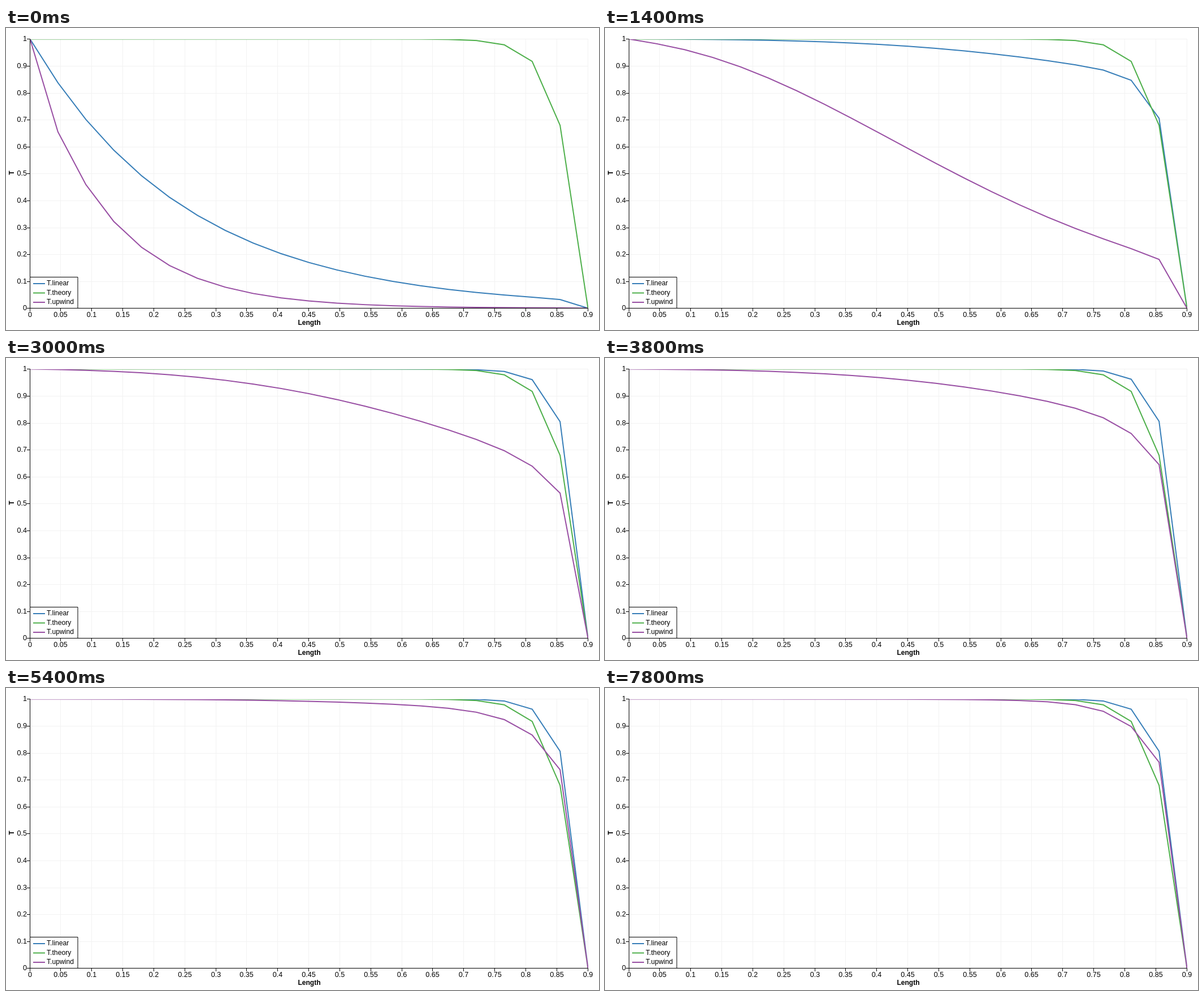
These frames come from a looping animation (1049 px wide and 534 px high, 8000 ms). An HTML page with a canvas:

```html
<!DOCTYPE html>
<html>
<head>
<meta charset="utf-8">
<style>
  html, body { margin: 0; width: 100%; height: 100%; overflow: hidden; background: #fff; }
  canvas { display: block; }
</style>
</head>
<body>
<canvas id="stage" width="1049" height="534"></canvas>
<script>
const W = 1049, H = 534;
const ctx = document.getElementById('stage').getContext('2d');
const CELLS = 20, STEPS = 40, STEP_MS = 200;
const PECLET = 1.35;        // cell Peclet number
const D = 1 / PECLET;       // diffusion coefficient relative to convection
const BLUE = '#377eb8', GREEN = '#4daf4a', PURPLE = '#984ea3';
const FONT = '"Liberation Sans", Arial, sans-serif';
const LEFT = 42.5, TOP = 19.5, SPAN_X = 987, SPAN_Y = 476;
const RIGHT = LEFT + SPAN_X, BOTTOM = TOP + SPAN_Y;

// Tick positions snapped to whole pixels.
const xTicks = Array.from({ length: 19 }, (_, i) => LEFT + Math.floor(i * SPAN_X / 18));
const yTicks = Array.from({ length: 11 }, (_, i) => BOTTOM - Math.floor(i * SPAN_Y / 10));

// Curves are drawn at double size so that overlapping edges do not mix.
const plot = document.createElement('canvas');
plot.width = 2 * W;
plot.height = 2 * H;
const plotCtx = plot.getContext('2d');
plotCtx.scale(2, 2);
plotCtx.beginPath();
plotCtx.rect(43, 20, 987, 476);
plotCtx.clip();

// Cell values to node values, with 1 at the inlet and 0 at the outlet.
const toNodes = c => [1, ...c.slice(1).map((v, i) => (v + c[i]) / 2), 0];

// Steady convection-diffusion: one Gauss-Seidel sweep per step.
function solve(west, east, first, last) {
  const c = Array(CELLS).fill(0), history = [];
  for (let n = 0; n < STEPS; n++) {
    for (let i = 0; i < CELLS; i++) {
      const inflow = i ? west * c[i - 1] : 1 + 2 * D;
      const back = i < CELLS - 1 ? east * c[i + 1] : 0;
      const diag = i === 0 ? first : i === CELLS - 1 ? last : west + east;
      c[i] = (inflow + back) / diag;
    }
    history.push(toNodes(c));
  }
  return history;
}

const linear = solve(D + 0.5, D - 0.5, 3 * D + 0.5, 3 * D - 0.5);
const upwind = solve(D + 1, D, 3 * D + 1, 3 * D);
const theory = toNodes(Array.from({ length: CELLS },
  (_, i) => 1 - Math.exp(PECLET * (i + 0.5 - CELLS))));

function line(points, color, width, g = ctx) {
  g.beginPath();
  points.forEach(([x, y]) => g.lineTo(x, y));
  g.strokeStyle = color;
  g.lineWidth = width;
  g.stroke();
}

function text(str, x, y, align, font) {
  ctx.font = font + ' ' + FONT;
  ctx.textAlign = align;
  ctx.fillStyle = '#000';
  ctx.fillText(str, x, y);
}

function curve(nodes, color) {
  line(nodes.map((v, i) => [LEFT + i / CELLS * SPAN_X, BOTTOM - v * SPAN_Y]), color, 2, plotCtx);
}

function curves(step) {
  plotCtx.clearRect(0, 0, W, H);
  curve(linear[step], BLUE);
  curve(theory, GREEN);
  curve(upwind[step], PURPLE);
  ctx.drawImage(plot, 0, 0, W, H);
}

function grid() {
  xTicks.forEach(x => line([[x, TOP], [x, BOTTOM]], '#f2f2f2', 1));
  yTicks.forEach(y => line([[LEFT, y], [RIGHT, y]], '#f2f2f2', 1));
}

function axes() {
  line([[LEFT, 19], [LEFT, 496]], '#000', 1);
  line([[42, BOTTOM], [1030, BOTTOM]], '#000', 1);
  xTicks.forEach((x, i) => {
    line([[x, 496], [x, 501]], '#000', 1);
    text(String(+(i * 0.05).toFixed(2)), x, 511, 'center', '12.5px');
  });
  yTicks.forEach((y, i) => {
    line([[37, y], [42, y]], '#000', 1);
    text(String(i / 10), 37, y + 3.5, 'right', '12.5px');
  });
  text('Length', 536.5, 525, 'center', 'bold 12px');
  ctx.save();
  ctx.translate(14, 256);
  ctx.rotate(-Math.PI / 2);
  text('T', 0, 0, 'center', 'bold 12px');
  ctx.restore();
}

function legend() {
  ctx.fillStyle = '#fff';
  ctx.strokeStyle = '#000';
  ctx.lineWidth = 1;
  ctx.beginPath();
  ctx.rect(42.5, 440.5, 84.5, 55);
  ctx.fill();
  ctx.stroke();
  [['T.linear', BLUE], ['T.theory', GREEN], ['T.upwind', PURPLE]].forEach(([name, color], i) => {
    const y = 452 + i * 16.5;
    line([[48, y], [69, y]], color, 2);
    text(name, 72, Math.round(y + 3), 'left', '12.2px');
  });
}

let shown = -1;
function draw() {
  const step = Math.floor(performance.now() / STEP_MS) % STEPS;
  if (step !== shown) {
    shown = step;
    ctx.fillStyle = '#fff';
    ctx.fillRect(0, 0, W, H);
    grid();
    curves(step);
    axes();
    legend();
  }
  requestAnimationFrame(draw);
}
draw();
</script>
</body>
</html>
```
